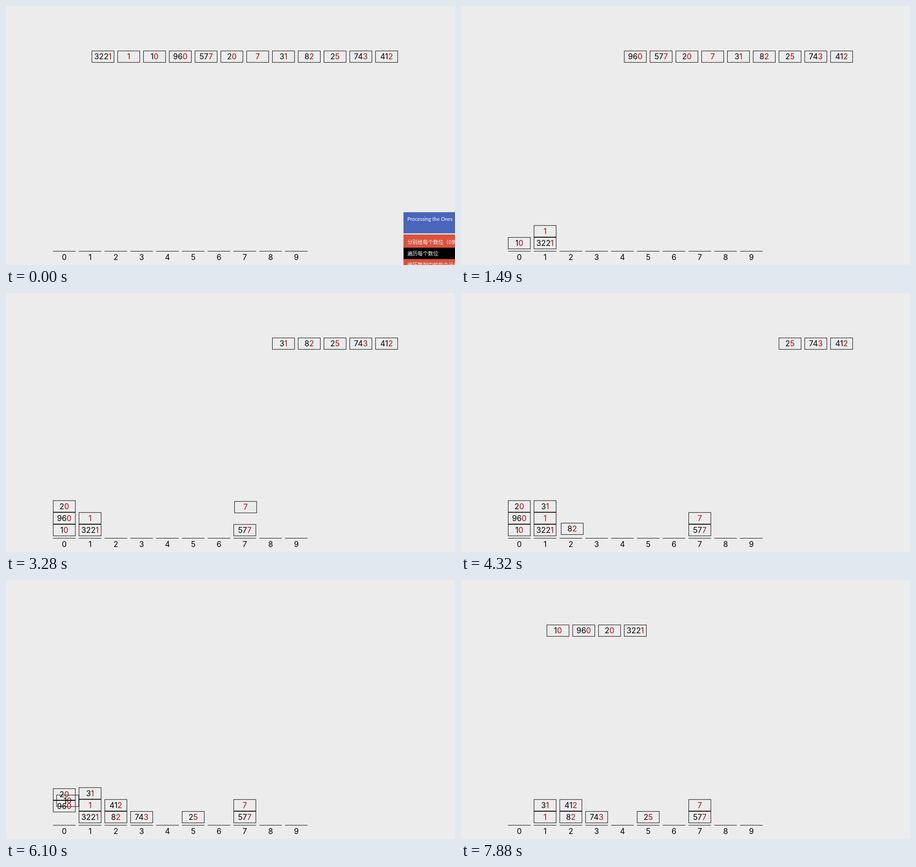
These frames come from a looping animation (985x569 px, 8000 ms). An HTML page:

```html
<!DOCTYPE html>
<html lang="en">
<head>
<meta charset="utf-8">
<title>Radix sort</title>
<style>
  html, body { margin: 0; width: 100%; height: 100%; overflow: hidden; background: #ececec; }
  svg { display: block; }
  text { font: 17px Inter, "Liberation Sans", sans-serif; text-anchor: middle; fill: #000; }
  .digit { fill: #b8000c; }
  .box { fill: none; stroke: #000; }
  .panel text { font: 11.3px "Noto Sans CJK SC", "Noto Sans CJK", sans-serif; text-anchor: start; fill: #fff; }
  .panel .title { font: 11.1px Lato, sans-serif; }
</style>
</head>
<body>
<svg id="stage" width="985" height="569" viewBox="0 0 985 569">
  <g class="panel" id="panel">
    <rect x="872" y="453" width="113" height="46.5" fill="#4a65bc"/>
    <rect x="872" y="502" width="113" height="67" fill="#db523d"/>
    <rect x="872" y="531" width="113" height="25" fill="#000"/>
    <text class="title" x="880.5" y="472">Processing the Ones</text>
    <text x="880.5" y="523">分别给每个数位（0到9）创建桶</text>
    <text x="880.5" y="548">遍历每个数位</text>
    <text x="880.5" y="572.5">遍历数列中的每个元素</text>
  </g>
</svg>
<script>
const LOOP = 8000, STEP = 148.8, LEAD = 7;
// Move timing, counted in steps
const FIRST = 0.84, PERIOD = 10 / 3, SPAN = 1.68;
// The scene is laid out on a grid scaled by 1/√2
const SCALE = Math.SQRT1_2;
const PITCH = 80 * SCALE, WIDTH = 70 * SCALE, HEIGHT = 37 * SCALE;
const BUCKET_X = 103.1, ROW_X = BUCKET_X + 1.5 * PITCH;
const ROW_Y = 98.2, FLOOR_Y = 507.9, BASE_Y = 538.3;
const VALUES = [3221, 1, 10, 960, 577, 20, 7, 31, 82, 25, 743, 412];
const COLLECTED = 4;

const stage = document.getElementById("stage");
const panel = document.getElementById("panel");

function add(parent, tag, attrs, text) {
  const el = document.createElementNS("http://www.w3.org/2000/svg", tag);
  for (const key in attrs) el.setAttribute(key, attrs[key]);
  if (text) el.textContent = text;
  parent.appendChild(el);
  return el;
}

for (let d = 0; d < 10; d++) {
  const x = BUCKET_X + d * PITCH;
  add(stage, "rect", { x, y: BASE_Y, width: WIDTH, height: 1 });
  add(stage, "text", { x: x + WIDTH / 2, y: 558 }, String(d));
}

const items = VALUES.map((value, i) => {
  const s = String(value);
  const group = add(stage, "g", {});
  add(group, "rect", { class: "box", x: 0.5, y: 0.5, width: WIDTH - 1, height: HEIGHT - 1 });
  const label = add(group, "text", { x: WIDTH / 2, y: 19.1 });
  if (s.length > 1) add(label, "tspan", {}, s.slice(0, -1));
  add(label, "tspan", { class: "digit" }, s.slice(-1));
  const x = ROW_X + i * PITCH;
  return { group, digit: value % 10, x, y: ROW_Y, endX: x, endY: ROW_Y };
});

// Each move is a list of shifts that run together
const moves = [];
const buckets = Array.from({ length: 10 }, () => []);

function shift(item, x, y) {
  const part = { item, dx: x - item.endX, dy: y - item.endY };
  item.endX = x;
  item.endY = y;
  return part;
}

for (const item of items) {
  const stack = buckets[item.digit];
  moves.push([shift(item, BUCKET_X + item.digit * PITCH, FLOOR_Y - stack.length * HEIGHT)]);
  stack.push(item);
}
for (let slot = 0; slot < COLLECTED; slot++) {
  const stack = buckets.find(b => b.length);
  const parts = [shift(stack.shift(), ROW_X + slot * PITCH, ROW_Y)];
  stack.forEach((item, h) => parts.push(shift(item, item.endX, FLOOR_Y - h * HEIGHT)));
  moves.push(parts);
}

// cubic-bezier(.25, .1, .25, 1)
function ease(x) {
  if (x <= 0) return 0;
  if (x >= 1) return 1;
  let lo = 0, hi = 1;
  for (let i = 0; i < 24; i++) {
    const t = (lo + hi) / 2;
    if (0.75 * t * (1 - t) + t ** 3 < x) lo = t; else hi = t;
  }
  return 0.3 * lo * (1 - lo) ** 2 + 3 * lo * lo * (1 - lo) + lo ** 3;
}

function draw(step) {
  panel.style.display = step < 1 ? "" : "none";
  const pos = new Map(items.map(item => [item, { x: item.x, y: item.y }]));
  moves.forEach((parts, k) => {
    const p = ease((step - FIRST - k * PERIOD) / SPAN);
    for (const { item, dx, dy } of parts) {
      pos.get(item).x += dx * p;
      pos.get(item).y += dy * p;
    }
  });
  pos.forEach(({ x, y }, item) => item.group.setAttribute("transform", `translate(${x} ${y})`));
}

let shown = 0;
const start = performance.now();
function tick() {
  const t = (performance.now() - start) % LOOP;
  const step = Math.floor((t + LEAD) / STEP);
  if (step !== shown) draw(shown = step);
  requestAnimationFrame(tick);
}
draw(0);
requestAnimationFrame(tick);
</script>
</body>
</html>
```
